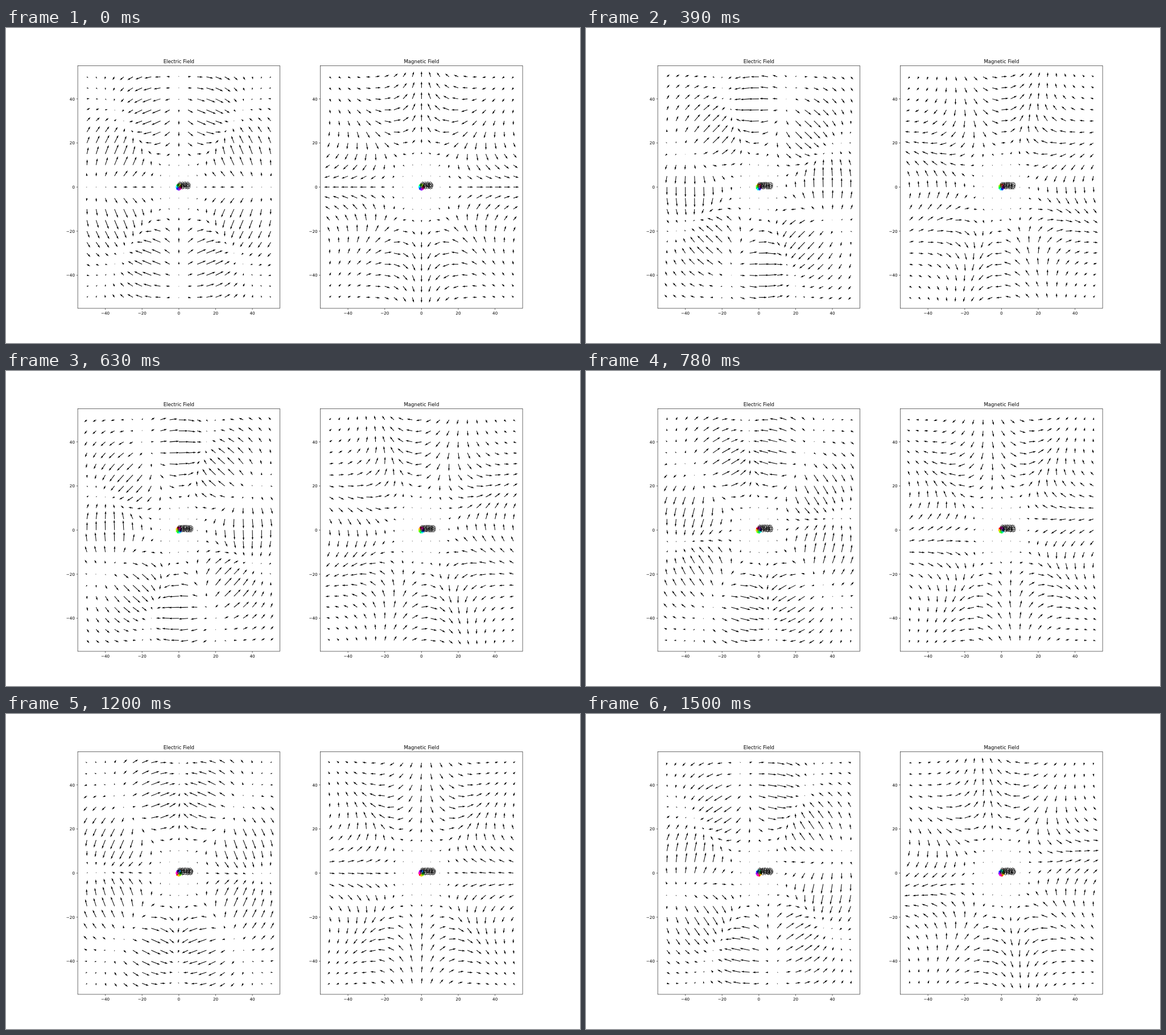
These frames come from a looping animation (1009 px wide and 555 px high, 1.53 s). An HTML page with a canvas:

```html
<!DOCTYPE html>
<html lang="en">
<head>
<meta charset="utf-8">
<title>Rotating charge ring</title>
<style>
html, body { margin: 0; width: 100%; height: 100%; overflow: hidden; background: #fff; }
canvas { display: block; width: 1009px; height: 555px; }
</style>
</head>
<body>
<canvas id="stage"></canvas>
<script>
const W = 1009, H = 555, LOOP = 1530, STEP = 30;
const PANEL_W = 355.45, TOP = 66.6, BOTTOM = 493.95;
const SX = PANEL_W / 110, SY = (BOTTOM - TOP) / 110, MID_Y = (TOP + BOTTOM) / 2;
const HEIGHT = 50;            // distance of the viewed plane from the ring
const CHARGES = 8;
const SHAFT = 0.06 / 21 * PANEL_W;
const FONT = '"DejaVu Sans", sans-serif';

const canvas = document.getElementById('stage');
const ctx = canvas.getContext('2d');
const dpr = window.devicePixelRatio || 1;
canvas.width = Math.round(W * dpr);
canvas.height = Math.round(H * dpr);

// Near field of a rotating ring of alternating charges, seen at HEIGHT
function common(x, y) {
  const u = Math.hypot(x, y) / HEIGHT;
  return { u, g: u ** 3 / (1 + u * u) ** 4.5, th: Math.atan2(y, x) };
}

function electric(x, y, phase) {
  const { u, g, th } = common(x, y);
  const psi = 4 * th - phase;
  const er = -g * (4 - 9 * u * u / (1 + u * u)) * Math.cos(psi);
  const et = 4 * g * Math.sin(psi);
  return [er * Math.cos(th) - et * Math.sin(th), er * Math.sin(th) + et * Math.cos(th)];
}

function magnetic(x, y, phase) {
  const { g, th } = common(x, y);
  return [g * Math.cos(phase - 3 * th), g * Math.sin(phase - 3 * th)];
}

function eachNode(fn) {
  for (let y = -50; y <= 50; y += 5)
    for (let x = -50; x <= 50; x += 5) fn(x, y);
}

function arrowScale(field) {
  let sum = 0;
  eachNode((x, y) => { sum += Math.hypot(...field(x, y, 0)); });
  return PANEL_W / (1.8 * 21 * sum / 441);
}

const panels = [
  { title: 'Electric Field', left: 126.12, field: electric },
  { title: 'Magnetic Field', left: 552.65, field: magnetic }
];
for (const p of panels) {
  p.mid = p.left + PANEL_W / 2;
  p.scale = arrowScale(p.field);
}

function polygon(points, px, py, c, s, k) {
  points.forEach(([a, b], i) => {
    const x = px + k * (a * c - b * s), y = py - k * (a * s + b * c);
    if (i) ctx.lineTo(x, y); else ctx.moveTo(x, y);
  });
  ctx.closePath();
}

const dot = Array.from({ length: 6 }, (_, i) =>
  [0.5 * Math.cos(i * Math.PI / 3), 0.5 * Math.sin(i * Math.PI / 3)]);

function arrow(px, py, u, v) {
  const mag = Math.hypot(u, v), len = mag / SHAFT;
  if (len < 1) return polygon(dot, px, py, 1, 0, SHAFT);
  const l = Math.max(len, 5), k = SHAFT * Math.min(1, len / 5);
  const shape = [[0, 0.5], [l - 4.5, 0.5], [l - 5, 1.5], [l, 0],
                 [l - 5, -1.5], [l - 4.5, -0.5], [0, -0.5]];
  polygon(shape, px, py, u / mag, v / mag, k);
}

function text(str, x, y, size, align) {
  ctx.font = size + 'px ' + FONT;
  ctx.textAlign = align;
  ctx.fillText(str, x, y);
}

function drawAxes(p) {
  ctx.lineWidth = 0.58;
  ctx.strokeStyle = ctx.fillStyle = '#000';
  ctx.strokeRect(p.left, TOP, PANEL_W, BOTTOM - TOP);
  ctx.beginPath();
  for (let v = -40; v <= 40; v += 20) {
    const x = p.mid + v * SX, y = MID_Y - v * SY;
    const label = String(v).replace('-', '\u2212');
    ctx.moveTo(x, BOTTOM);
    ctx.lineTo(x, BOTTOM + 2.55);
    ctx.moveTo(p.left, y);
    ctx.lineTo(p.left - 2.55, y);
    text(label, x, BOTTOM + 10.6, 7.2, 'center');
    text(label, p.left - 5.1, y + 2.7, 7.2, 'right');
  }
  ctx.stroke();
  text(p.title, p.mid, TOP - 4.4, 8.6, 'center');
}

function drawRing(p, step) {
  const spots = Array.from({ length: CHARGES }, (_, n) => {
    const a = n * 2 * Math.PI / CHARGES + step * 0.1;
    return [p.mid + SX * Math.cos(a), MID_Y - SY * Math.sin(a)];
  });
  spots.forEach(([x, y], n) => {
    ctx.fillStyle = `hsl(${n * 360 / CHARGES}, 100%, 50%)`;
    ctx.beginPath();
    ctx.arc(x, y, 2.4, 0, 2 * Math.PI);
    ctx.fill();
  });
  ctx.fillStyle = '#000';
  spots.forEach(([x, y], n) => text(`P${n}T${step}`, x, y, 7.2, 'left'));
}

function draw(step) {
  ctx.setTransform(dpr, 0, 0, dpr, 0, 0);
  ctx.fillStyle = '#fff';
  ctx.fillRect(0, 0, W, H);
  for (const p of panels) {
    drawAxes(p);
    ctx.beginPath();
    eachNode((x, y) => {
      const [u, v] = p.field(x, y, step * 0.4);
      arrow(p.mid + x * SX, MID_Y - y * SY, u * p.scale, v * p.scale);
    });
    ctx.fill();
    drawRing(p, step);
  }
}

let shown = -1;
function tick() {
  const t = performance.now() % LOOP;
  const step = Math.max(0, Math.floor(t / STEP) - 1);
  if (step !== shown) draw(shown = step);
  requestAnimationFrame(tick);
}
tick();
</script>
</body>
</html>
```
